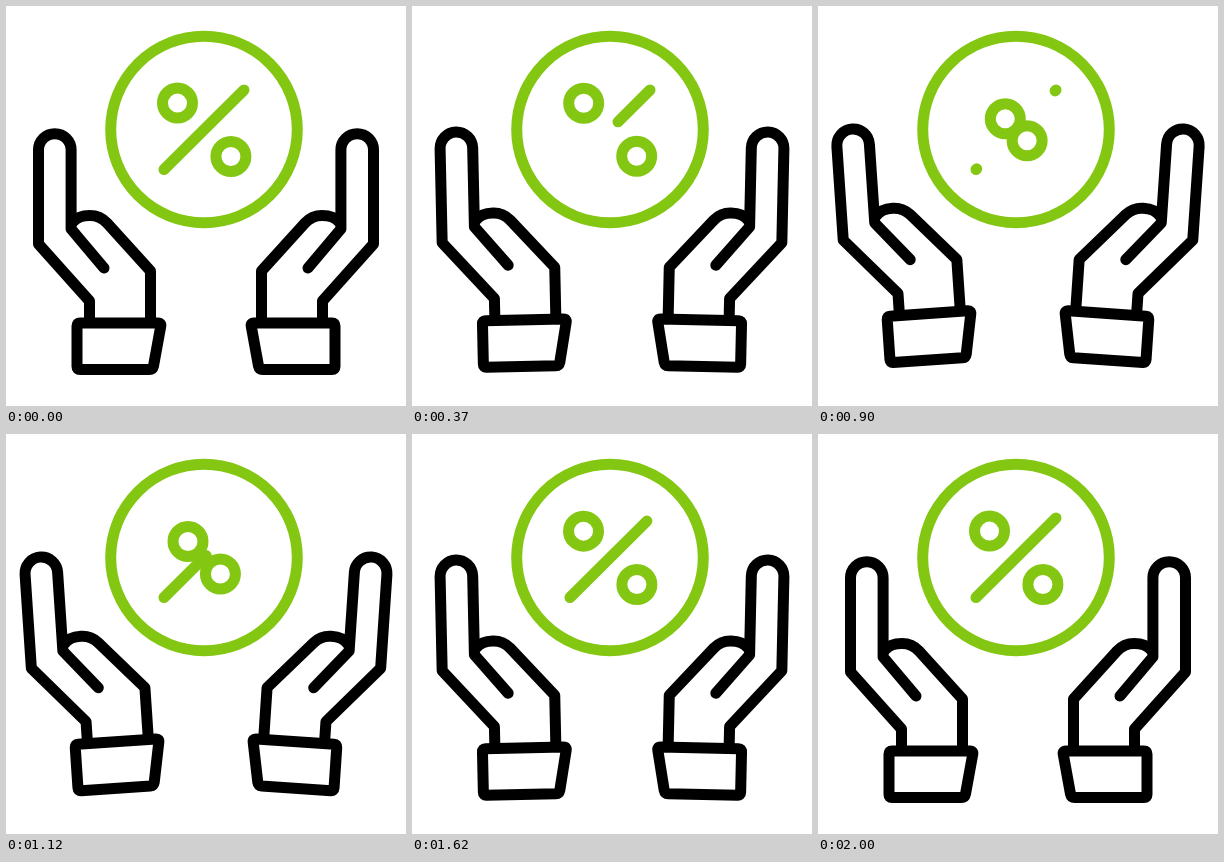
These frames come from a looping animation (400x400 px, 2.02 s). An HTML page:

```html
<!DOCTYPE html>
<html>
<head>
<meta charset="utf-8">
<style>
html, body { margin: 0; width: 100%; height: 100%; overflow: hidden; background: #fff; }
svg { display: block; width: 100vw; height: 100vh; fill: none; stroke-width: 11; stroke-linecap: round; stroke-linejoin: round; }
</style>
</head>
<body>
<svg viewBox="0 0 400 400">
  <defs>
    <g id="hand" stroke="#000">
      <path d="M83.5 315V295L32.5 238V144a16.3 16.3 0 0 1 32.6 0V223L98 262"/>
      <path d="M67 216Q72 209.5 84 209.5Q94 209.5 101 217L144.5 265V315"/>
      <path d="M74 317H152Q155.500 317 154.700 320.500L147.500 360Q146.700 363.500 143.500 363.500H74Q71 363.500 71 360.500V320Q71 317 74 317Z"/>
    </g>
  </defs>
  <use id="left" href="#hand"/>
  <g transform="matrix(-1 0 0 1 400 0)"><use id="right" href="#hand"/></g>
  <g stroke="#84c713">
    <circle cx="198" cy="123.500" r="93.300"/>
    <path id="slash" d="M238 84L158 163.500" pathLength="100" stroke-dasharray="100 98"/>
    <circle id="dotA" r="15"/>
    <circle id="dotB" r="15"/>
  </g>
</svg>
<script>
const LOOP = 2020, STEP = 25, HALF = 40;
const el = id => document.getElementById(id);

function bezier(x1, y1, x2, y2) {
  const at = (a, b, s) => 3 * (1 - s) ** 2 * s * a + 3 * (1 - s) * s * s * b + s ** 3;
  return x => {
    let lo = 0, hi = 1;
    for (let i = 0; i < 24; i++) {
      const mid = (lo + hi) / 2;
      if (at(x1, x2, mid) < x) lo = mid; else hi = mid;
    }
    return at(y1, y2, lo);
  };
}

const smooth = x => x * x * (3 - 2 * x);
const redraw = bezier(.1, .7, .3, 1);

function draw(ms) {
  const step = Math.floor((ms % LOOP + 5) / STEP);
  const out = step <= HALF;
  const x = out ? step / HALF : step / HALF - 1;

  // Hands lean outwards and return
  const angle = -4 * smooth(out ? x : 1 - x);
  for (const id of ["left", "right"]) el(id).setAttribute("transform", `rotate(${angle} -28 343)`);

  // The slash is wiped upwards, then drawn again from below
  const offset = out ? 100 * (1 - (1 - x) ** 1.95) : 100 + 98 * redraw(x);
  el("slash").setAttribute("stroke-dashoffset", offset);

  // The rings meet in the middle and spring apart
  const gap = 26.7 * (out ? 1 - x ** 5 : 1 - (1 - x) ** 7);
  el("dotA").setAttribute("transform", `translate(${198.2 - gap} ${123.8 - gap})`);
  el("dotB").setAttribute("transform", `translate(${198.2 + gap} ${123.8 + gap})`);
}

const start = performance.now();
function tick() {
  draw(performance.now() - start);
  requestAnimationFrame(tick);
}
tick();
</script>
</body>
</html>
```
